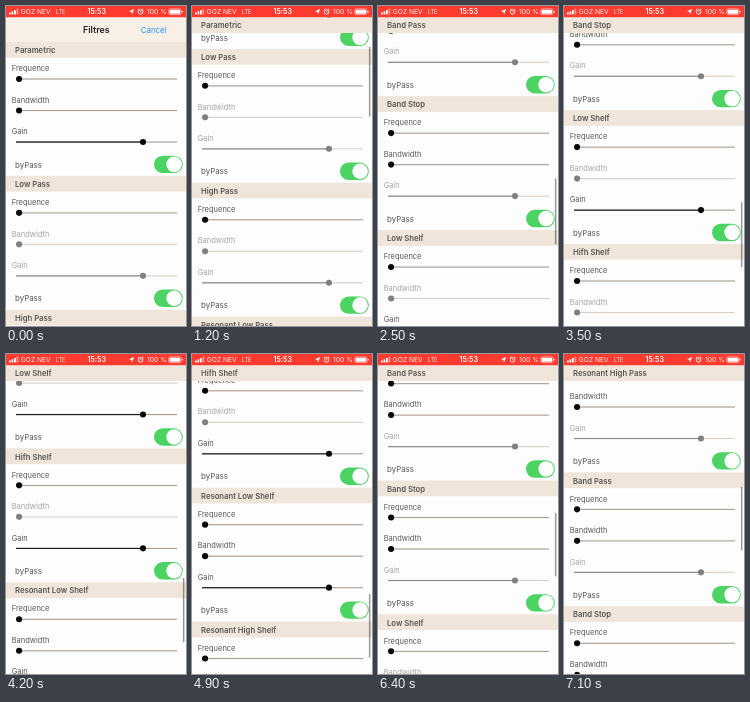
An HTML page with a canvas for the animation above (7200 ms loop, 180 px wide and 320 px high).

```html
<!DOCTYPE html>
<html lang="en">
<head>
<meta charset="utf-8">
<title>Filtres</title>
<style>
html, body { margin: 0; width: 100%; height: 100%; overflow: hidden; background: #fff; }
canvas { display: block; width: 100vw; height: 100vh; }
</style>
</head>
<body>
<canvas id="stage"></canvas>
<script>
const W = 180, H = 320, LOOP = 7200, STEP = 100;
const PT = 0.5625; // stage pixels per device point
const STATUS_H = 20 * PT, NAV_H = 44 * PT, HEAD_H = 28 * PT, ROW_H = 56 * PT;
const SECTION_H = 238 * PT, VIEW_H = H - STATUS_H;

const ALL = ['Frequence', 'Bandwidth', 'Gain'];
const sections = [
  ['Parametric', ALL],
  ['Low Pass', ['Frequence']],
  ['High Pass', ['Frequence']],
  ['Resonant Low Pass', ['Frequence', 'Bandwidth']],
  ['Resonant High Pass', ['Frequence', 'Bandwidth']],
  ['Band Pass', ['Frequence', 'Bandwidth']],
  ['Band Stop', ['Frequence', 'Bandwidth']],
  ['Low Shelf', ['Frequence', 'Gain']],
  ['Hifh Shelf', ['Frequence', 'Gain']],
  ['Resonant Low Shelf', ALL],
  ['Resonant High Shelf', ALL]
].map(([title, enabled]) => ({ title, enabled }));

const CONTENT_H = NAV_H + sections.length * SECTION_H;
const MAX_SCROLL = CONTENT_H - VIEW_H;

// time, scroll offset, speed in px per ms
const path = [
  [900, 0, 0], [1900, 660.9, 0.25], [2500, 749.1, 0.12], [3500, 869, 0.14],
  [4900, 1107.2, 0], [5800, 844.2, -0.23], [7100, 587, -0.15]
];

const canvas = document.getElementById('stage');
const ctx = canvas.getContext('2d');

function scrollAt(t) {
  if (t <= path[0][0]) return 0;
  const i = path.findIndex(p => p[0] >= t);
  if (i < 0) return path[path.length - 1][1];
  const [t0, y0, v0] = path[i - 1], [t1, y1, v1] = path[i];
  const d = t1 - t0, u = (t - t0) / d, r = 1 - u;
  return r * r * (1 + 2 * u) * y0 + u * u * (3 - 2 * u) * y1
    + u * r * d * (r * v0 - u * v1);
}

function rect(x, y, w, h, color) {
  ctx.fillStyle = color;
  ctx.fillRect(x, y, w, h);
}

function pill(x, y, w, h, r, color) {
  ctx.fillStyle = color;
  ctx.beginPath();
  ctx.roundRect(x, y, w, h, r);
  ctx.fill();
}

function dot(x, y, r, color) {
  ctx.fillStyle = color;
  ctx.beginPath();
  ctx.arc(x, y, r, 0, Math.PI * 2);
  ctx.fill();
}

function text(str, x, y, size, color, weight = 400, align = 'left') {
  ctx.font = `${weight} ${size}px Inter, Roboto, sans-serif`;
  ctx.textAlign = align;
  ctx.fillStyle = color;
  ctx.fillText(str, x, y + size * 0.36);
}

function line(points, width) {
  ctx.strokeStyle = '#fff';
  ctx.lineWidth = width;
  ctx.beginPath();
  points.forEach(([x, y]) => ctx.lineTo(x, y));
  ctx.stroke();
}

function drawSlider(label, y, on) {
  const x = label === 'Gain' ? 137 : 13.1;
  text(label, 5.7, y + 10.7, 7.5, on ? '#585858' : '#a6a6a6');
  rect(10, y + 20.7, 161, 1.15, on ? '#aba097' : '#d8d1cb');
  rect(10, y + 20.7, x - 10, 1.15, on ? '#1c1c1c' : '#8a8a8a');
  dot(x, y + 21.2, 3.05, on ? '#080808' : '#808080');
}

function drawSwitch(y) {
  pill(148, y - 8.7, 28.8, 17.4, 8.7, '#4cd463');
  dot(168.1, y + 0.4, 7.9, 'rgba(0,0,0,.08)');
  dot(168.1, y, 7.8, '#fff');
}

function drawHeader(title, y) {
  rect(0, y, W, HEAD_H, '#efe5db');
  text(title, 9, y + 8.4, 7.7, '#595450', 600);
}

function drawSection({ enabled }, y) {
  ALL.forEach((name, i) => drawSlider(name, y + HEAD_H + i * ROW_H, enabled.includes(name)));
  text('byPass', 9, y + 122.7, 7.9, '#555');
  drawSwitch(y + 122.4);
}

function drawNav(y) {
  rect(0, y, W, NAV_H, '#f8f0e7');
  text('Filtres', 90.3, y + 12.7, 8.9, '#1c1c1c', 600, 'center');
  text('Cancel', 134.7, y + 12.7, 7.9, '#2590ee');
}

function drawTable(scroll) {
  const tops = sections.map((_, i) => STATUS_H + NAV_H + i * SECTION_H - scroll);
  const shown = y => y < H && y + SECTION_H > STATUS_H;
  drawNav(STATUS_H - scroll);
  sections.forEach((s, i) => shown(tops[i]) && drawSection(s, tops[i]));
  sections.forEach((s, i) => {
    if (!shown(tops[i])) return;
    const pinned = Math.max(tops[i], STATUS_H);
    drawHeader(s.title, Math.min(pinned, tops[i] + SECTION_H - HEAD_H));
  });
}

function drawIndicator(t, scroll) {
  if (scroll <= 0) return;
  // the content height is an estimate until every row has been reached
  const unseen = t < 4900 ? Math.max(0, MAX_SCROLL - scroll) : 0;
  const ratio = VIEW_H / (CONTENT_H - 0.13 * unseen);
  pill(176.9, STATUS_H + scroll * ratio + 0.5, 1.5, VIEW_H * ratio, 0.75, 'rgba(0,0,0,.4)');
}

function drawStatus() {
  rect(0, 0, W, STATUS_H, '#ff3b30');
  for (let i = 0; i < 4; i++) {
    const h = 1.9 + i * 1.3;
    pill(3 + i * 2.5, 8.4 - h, 1.8, h, 0.4, i < 3 ? '#fff' : 'rgba(255,255,255,.45)');
  }
  text('GOZ NEV', 14.8, 5.8, 6.7, '#ffece9');
  text('LTE', 49.8, 5.8, 5.6, '#ffece9');
  text('15:53', 90.7, 5.8, 7.1, '#fff', 600, 'center');

  ctx.fillStyle = '#fff';
  ctx.beginPath();
  [[128.2, 3], [126, 8.4], [125.4, 5.8], [122.8, 5.2]].forEach(([x, y]) => ctx.lineTo(x, y));
  ctx.fill();

  ctx.strokeStyle = '#fff';
  ctx.lineWidth = 0.8;
  ctx.beginPath();
  ctx.arc(134.6, 5.9, 2.3, 0, Math.PI * 2);
  ctx.stroke();
  line([[134.6, 4.5], [134.6, 6], [135.7, 6]], 0.6);
  line([[131.8, 4], [133.2, 2.8]], 0.8);
  line([[136, 2.8], [137.4, 4]], 0.8);

  text('100 %', 141, 5.8, 6.8, '#ffece9');
  ctx.lineWidth = 0.5;
  ctx.beginPath();
  ctx.roundRect(162.7, 2.9, 12.3, 5.7, 1.4);
  ctx.stroke();
  pill(163.6, 3.8, 10.5, 3.9, 0.7, '#fff');
  pill(175.6, 4.8, 0.9, 1.9, 0.4, '#fff');
}

function resize() {
  const dpr = window.devicePixelRatio || 1;
  const w = Math.round(innerWidth * dpr), h = Math.round(innerHeight * dpr);
  if (canvas.width !== w || canvas.height !== h) {
    canvas.width = w;
    canvas.height = h;
  }
  ctx.setTransform(w / W, 0, 0, h / H, 0, 0);
}

const start = performance.now();

function frame() {
  const elapsed = (performance.now() - start) % LOOP;
  const t = Math.floor(elapsed / STEP) * STEP;
  const scroll = scrollAt(t);
  resize();
  rect(0, 0, W, H, '#fefdfd');
  drawTable(scroll);
  drawIndicator(t, scroll);
  drawStatus();
  requestAnimationFrame(frame);
}

frame();
</script>
</body>
</html>
```
